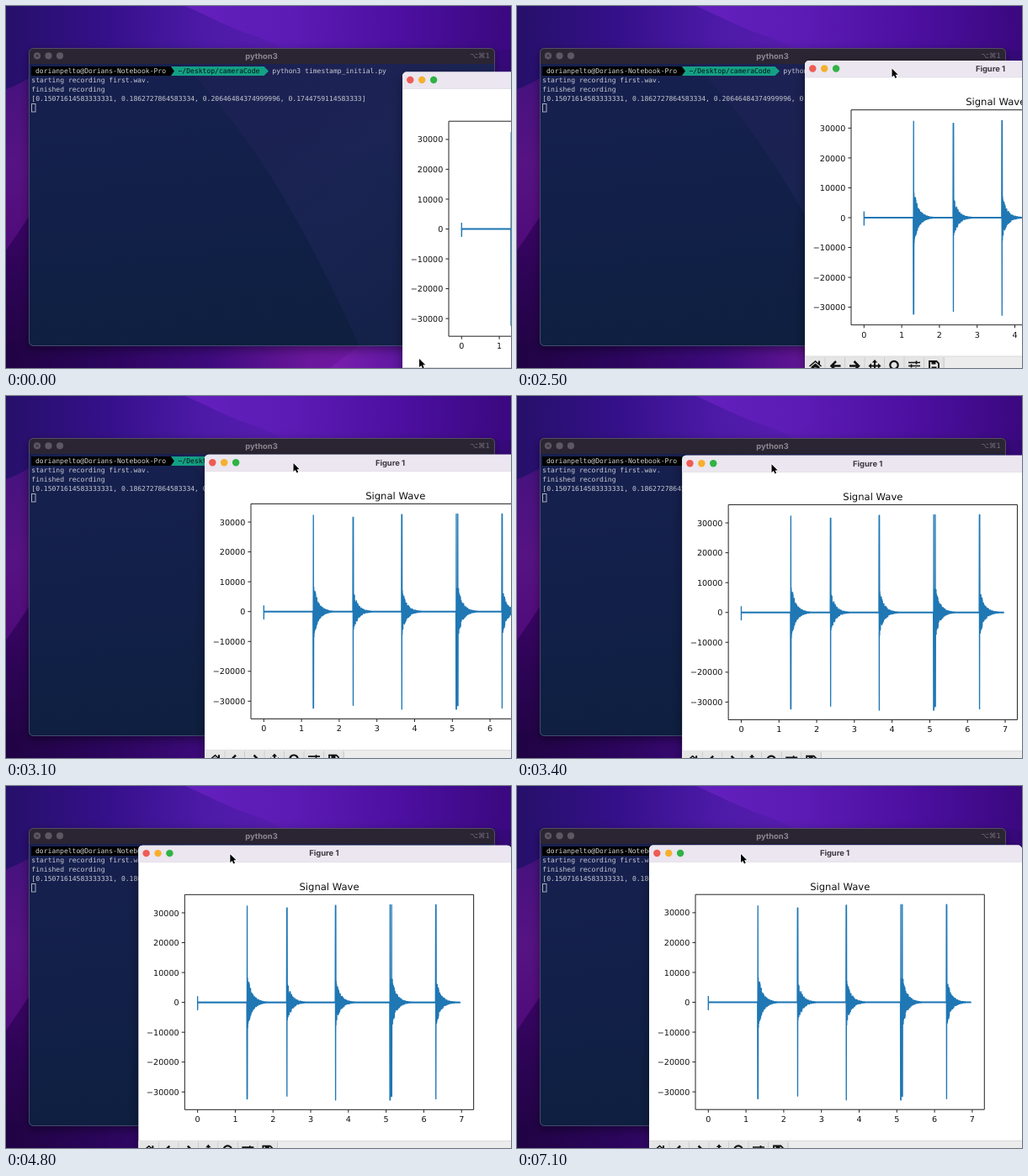
Write an HTML page with a canvas that moves like this. It is 600x431 px and loops after 7200 ms.

```html
<!DOCTYPE html>
<html lang="en">
<head>
<meta charset="utf-8">
<title>Signal Wave</title>
<style>
  html, body { margin: 0; width: 100%; height: 100%; overflow: hidden; background: #24084f; }
  canvas { display: block; width: 600px; height: 431px; }
</style>
</head>
<body>
<canvas id="stage" width="600" height="431"></canvas>
<script>
const LOOP = 7200, STEP = 100, W = 600, H = 431;
const ctx = document.getElementById('stage').getContext('2d');
const MONO = '8.05px "DejaVu Sans Mono", monospace';
const UI = 'bold 9.4px Inter, sans-serif';

// Keys: time, x, y
const windowPath = [
  [0, 471, 78.5], [1600, 471, 78.5], [2000, 432, 72], [2500, 342, 65],
  [3100, 236, 69.7], [3600, 180, 71], [4400, 159.5, 71], [5000, 157, 70.5], [LOOP, 157, 70.5]
];
const pointerPath = [
  [0, 491, 420], [150, 491, 420], [1300, 573, 90], [1600, 573, 90], [2000, 535, 83],
  [2500, 445.5, 74.5], [3100, 341.5, 80], [3600, 287, 81.5], [4400, 268.5, 81.5],
  [5000, 266, 81], [LOOP, 266, 81]
];

// Monotone cubic through the keys
function along(path, t) {
  let i = 0;
  while (i < path.length - 2 && t >= path[i + 1][0]) i++;
  const a = path[i], b = path[i + 1], span = b[0] - a[0], u = (t - a[0]) / span;
  const slope = (j, k) => (path[j + 1][k] - path[j][k]) / (path[j + 1][0] - path[j][0]);
  const tangent = (j, k) => {
    if (j === 0 || j === path.length - 1) return 0;
    const p = slope(j - 1, k), q = slope(j, k);
    return p * q <= 0 ? 0 : 2 * p * q / (p + q);
  };
  const h = u * u * (3 - 2 * u);
  return [1, 2].map(k => a[k] + (b[k] - a[k]) * h +
    span * (tangent(i, k) * u * (1 - u) ** 2 - tangent(i + 1, k) * u * u * (1 - u)));
}

function randomizer(seed) {
  return () => (seed = (seed * 16807) % 2147483647) / 2147483647;
}

function gradient(x0, y0, x1, y1, ...colors) {
  const g = ctx.createLinearGradient(x0, y0, x1, y1);
  colors.forEach((c, i) => g.addColorStop(i / (colors.length - 1), c));
  return g;
}

function box(x, y, w, h, fill, radius = 0) {
  ctx.fillStyle = fill;
  ctx.beginPath();
  ctx.roundRect(x, y, w, h, radius);
  ctx.fill();
}

function dot(x, y, r, fill) {
  ctx.fillStyle = fill;
  ctx.beginPath();
  ctx.arc(x, y, r, 0, Math.PI * 2);
  ctx.fill();
}

function shape(d, fill) {
  ctx.fillStyle = fill;
  ctx.fill(new Path2D(d));
}

function line(d, color, width = 1) {
  ctx.strokeStyle = color;
  ctx.lineWidth = width;
  ctx.stroke(new Path2D(d));
}

function text(str, x, y, font, color, align = 'left') {
  ctx.font = font;
  ctx.fillStyle = color;
  ctx.textAlign = align;
  ctx.fillText(str, x, y);
}

function drawWallpaper() {
  box(0, 0, W, H, gradient(0, 0, W, 0, '#26106a', '#35108a', '#4d1aa8', '#5b1db0', '#4a0f9c', '#350878'));
  shape('M213 0C240 12 262 24 288 33Q312 41 332 52H600V0Z',
    gradient(213, 0, 600, 0, '#6420bd', '#5b1bb4', '#4c0fa0', '#3a087f'));
  shape('M0 99Q16 94 40 78V431H0Z', gradient(0, 80, 0, 300, '#45127e', '#561383', '#500a79'));
  shape('M0 291L40 232V431H0Z', gradient(0, 240, 0, 431, '#3c0568', '#2b0453', '#200341'));
  box(0, 400, W, 31, gradient(0, 0, W, 0, '#200343', '#2b055d', '#3d0a7c', '#6a179c', '#6f1ba8', '#4c118b'));
  shape('M385 431L425 400H480V431Z', gradient(385, 0, 480, 0, '#7a1fae', '#5b15a0'));
}

function drawTerminal() {
  ctx.save();
  ctx.shadowColor = 'rgba(0,0,0,.4)';
  ctx.shadowBlur = 12;
  ctx.shadowOffsetY = 4;
  box(27, 50, 554, 355, '#15204c', 5);
  ctx.restore();

  ctx.save();
  ctx.beginPath();
  ctx.roundRect(27, 50, 554, 355, 5);
  ctx.clip();
  box(27, 69, 554, 336, gradient(100, 69, 130, 405, '#17204f', '#122049', '#0e1f40'));
  shape('M210 69C290 150 350 250 420 405H581V69Z',
    gradient(250, 90, 540, 380, 'rgba(44,36,96,.25)', 'rgba(33,40,92,.5)', 'rgba(30,35,85,.35)'));
  box(27, 50, 554, 19, '#2b2533');
  ctx.restore();
  ctx.strokeStyle = 'rgba(150,140,175,.4)';
  ctx.lineWidth = 1;
  ctx.beginPath();
  ctx.roundRect(27.5, 50.5, 553, 354, 5);
  ctx.stroke();

  [37, 50.5, 64].forEach(x => dot(x, 59.3, 4.1, '#5d5663'));
  line('M35.5 57.8L38.5 60.8M38.5 57.8L35.5 60.8', '#2b2533', 1);
  text('python3', 303.5, 62.5, UI, '#8d8792', 'center');
  text('⌥⌘1', 575, 62, '8.5px "DejaVu Sans", sans-serif', '#716a78', 'right');

  shape('M30 72H196L200 77.5L196 83H30Z', '#000');
  shape('M196 72H306.5L312 77.5L306.5 83H196L200 77.5Z', '#14a085');
  text('dorianpelto@Dorians-Notebook-Pro', 35, 80, MONO, '#d4d4d4');
  text('~/Desktop/cameraCode', 204.5, 80, MONO, '#04120f');
  const output = [
    'starting recording first.wav.',
    'finished recording',
    '[0.15071614583333331, 0.1862727864583334, 0.20646484374999996, 0.1744759114583333]'
  ];
  text('python3 timestamp_initial.py', 316.3, 80, MONO, '#c9cbd3');
  output.forEach((row, i) => text(row, 30.3, 91.3 + i * 11, MONO, '#c9cbd3'));
  ctx.lineWidth = 1;
  ctx.strokeStyle = '#a9adb8';
  ctx.strokeRect(30.5, 116.5, 4.5, 9.5);
}

// Plot geometry, relative to the figure window
const plotX = s => 70.3 + s * 44.8;
const plotY = v => 187 - v * 0.003555;

// Start, top peak, bottom peak, ring-down size
const hits = [
  [1.31, 32300, 32300, 10500], [2.365, 31600, 31400, 7600], [3.655, 32500, 32700, 8600],
  [5.1, 32700, 32700, 9500], [5.14, 32700, 31500, 9500], [6.315, 32700, 32300, 9000]
];

function buildWave() {
  const path = new Path2D(), rand = randomizer(4711);
  path.moveTo(plotX(0), plotY(2100));
  path.lineTo(plotX(0), plotY(-2500));
  path.lineTo(plotX(0.004), plotY(0));
  for (let i = 1, up = true; i * 0.005 < 6.97; i++, up = !up) {
    const s = i * 0.005;
    let value = 90;
    for (const [start, top, bottom, ring] of hits) {
      const dt = s - start;
      if (dt < -0.001 || dt > 0.8) continue;
      const spike = dt < 0.014 ? (up ? top : bottom) : 0;
      const decay = ring * Math.exp(-dt / 0.125) * (0.6 + 0.4 * rand());
      value = Math.max(value, spike, decay);
    }
    path.lineTo(plotX(s), plotY(up ? value : -value));
  }
  return path;
}
const wave = buildWave();

function drawPlot() {
  const label = '9.6px "DejaVu Sans", sans-serif';
  ctx.strokeStyle = '#1f77b4';
  ctx.lineWidth = 1.35;
  ctx.lineJoin = 'round';
  ctx.stroke(wave);
  ctx.strokeStyle = '#222';
  ctx.lineWidth = 1;
  ctx.strokeRect(55, 58.7, 343.3, 256);
  for (let s = 0; s <= 7; s++) {
    const x = plotX(s);
    line(`M${x} 314.7v3.6`, '#222');
    text(s, x, 329.6, label, '#111', 'center');
  }
  for (let v = -30000; v <= 30000; v += 10000) {
    const y = plotY(v);
    line(`M55 ${y}h-3.6`, '#222');
    text(String(v).replace('-', '−'), 48.3, y + 3.6, label, '#111', 'right');
  }
  text('Signal Wave', 226.7, 53, '11.6px "DejaVu Sans", sans-serif', '#111', 'center');
}

// Icons are drawn around their own centre
const icons = [
  () => shape('M-7.5 0L0 -6.5L3.5 -3.5V-6H5.5V-1.8L7.5 0L6.5 1L0 -4.4L-6.5 1ZM-5 1L0 -3L5 1V6H1.5V2H-1.5V6H-5Z', '#111'),
  () => line('M1 -5.5L-4.5 0L1 5.5M-4.5 0H6.5', '#111', 2.5),
  () => line('M-1 -5.5L4.5 0L-1 5.5M4.5 0H-6.5', '#111', 2.5),
  () => {
    line('M0 -5V5M-5 0H5', '#111', 2);
    for (let i = 0; i < 4; i++) {
      shape('M0 -7.5L3.2 -4H-3.2Z', '#111');
      ctx.rotate(Math.PI / 2);
    }
  },
  () => {
    ctx.beginPath();
    ctx.arc(-0.5, -1, 4.7, 0, Math.PI * 2);
    ctx.strokeStyle = '#111';
    ctx.lineWidth = 2.2;
    ctx.stroke();
    line('M3 3L6 6', '#111', 2.5);
  },
  () => line('M-7 -4H7M-7 0H7M-7 4H7M2.5 -6V-2M-3.5 -2V2M2 2V6', '#111', 1.7),
  () => {
    line('M-5.5 -5.5H3L5.5 -3V5.5H-5.5Z', '#111', 1.8);
    shape('M-3 -6H2V-2H-3ZM-3 1H3V5H-3Z', '#111');
  }
];

function drawToolbar() {
  box(0, 352, 443, 34, '#ececec');
  line('M0 352H443', '#d3d3d3', 0.8);
  icons.forEach((icon, i) => {
    const x = 12.5 + i * 23.5;
    box(x - 11.5, 353, 23, 26, '#e5e5e5', 2);
    line(`M${x + 11.7} 353v26`, '#bdbdbd', 0.8);
    ctx.save();
    ctx.translate(x, 363.5);
    ctx.lineJoin = 'miter';
    icon();
    ctx.restore();
  });
}

function drawFigure([x, y]) {
  ctx.save();
  ctx.translate(x, y);
  ctx.save();
  ctx.shadowColor = 'rgba(0,0,0,.4)';
  ctx.shadowBlur = 14;
  ctx.shadowOffsetY = 5;
  box(0, 0, 443, 386, '#fff', 5);
  ctx.restore();
  box(0, 0, 443, 20, '#ebe6ef', [5, 5, 0, 0]);
  line('M0 20H443', '#dcd7df', 0.6);
  ['#ee5c54', '#f5b02e', '#2fb344'].forEach((c, i) => dot(9.3 + i * 13.9, 9.5, 4.2, c));
  text('Figure 1', 220.5, 12.8, UI, '#3c383f', 'center');
  drawPlot();
  drawToolbar();
  ctx.restore();
}

function drawPointer([x, y]) {
  ctx.save();
  ctx.translate(x, y);
  const arrow = 'M0 0V10L2.3 7.9L4 11.4L5.7 10.6L4.1 7.2H7.2Z';
  ctx.lineJoin = 'round';
  line(arrow, '#fff', 1.6);
  shape(arrow, '#000');
  ctx.restore();
}

function frame(now) {
  const t = Math.floor((now % LOOP) / STEP) * STEP;
  ctx.textRendering = 'geometricPrecision';
  drawWallpaper();
  drawTerminal();
  drawFigure(along(windowPath, t));
  drawPointer(along(pointerPath, t));
}

const began = performance.now();
function tick() {
  frame(performance.now() - began);
  requestAnimationFrame(tick);
}
tick();
</script>
</body>
</html>
```
